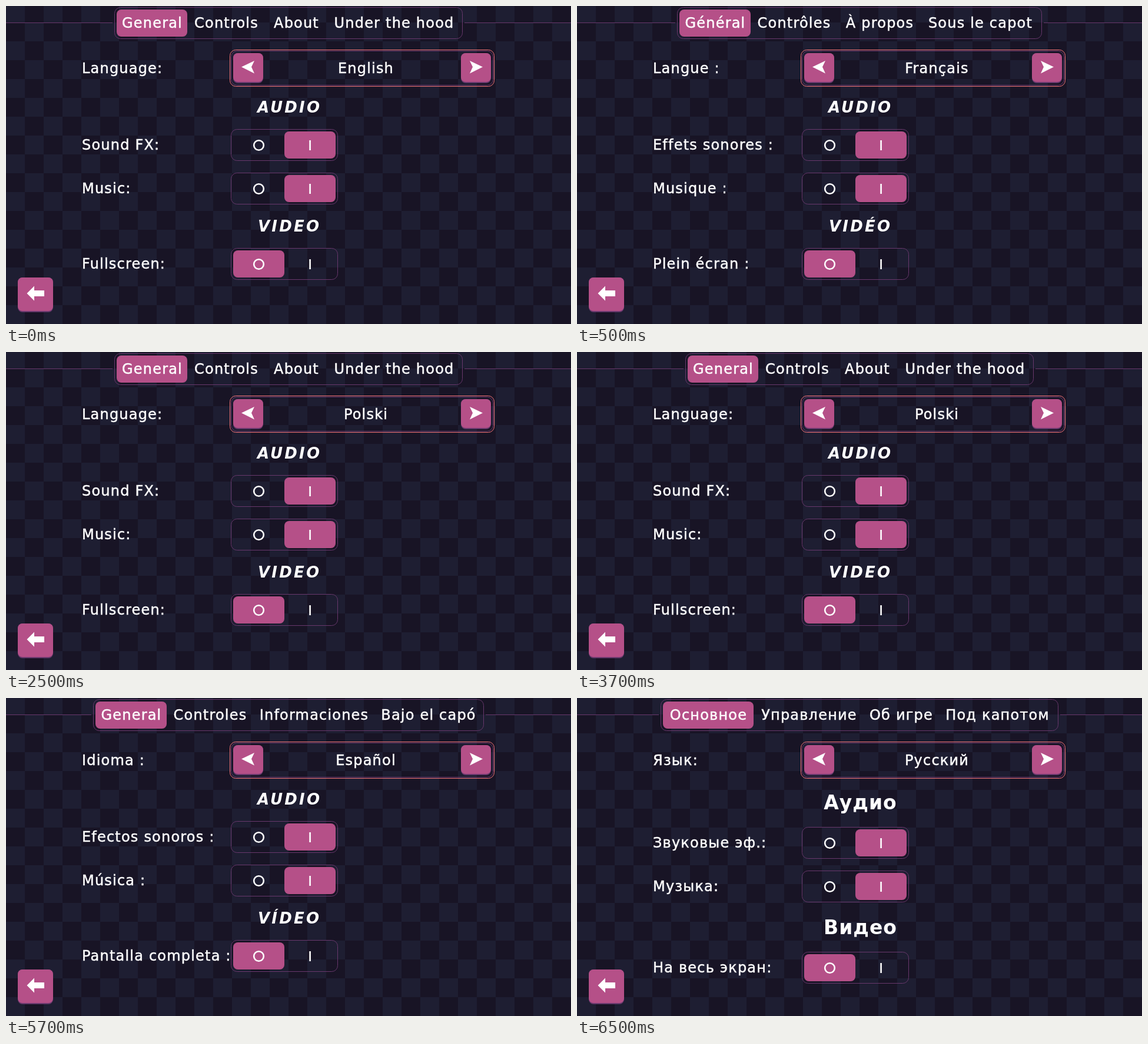
Write an HTML page that moves like this. It is 960x540 px and loops after 8 s.

```html
<!DOCTYPE html>
<html lang="en">
<head>
<meta charset="utf-8">
<title>Settings menu</title>
<style>
  html, body { margin: 0; width: 100%; height: 100%; overflow: hidden; background: #181425; }
  #stage { position: relative; width: 960px; height: 540px; overflow: hidden; }
  #stage svg { display: block; position: absolute; left: 0; top: 0; }
  #strip { animation: switch 8s step-end infinite; }
  #strip svg { position: static; }
  @keyframes switch {
    0% { transform: translateY(0); }
    6.25% { transform: translateY(-540px); }
    31.25% { transform: translateY(-1080px); }
    56.25% { transform: translateY(-1620px); }
    81.25%, 100% { transform: translateY(-2160px); }
  }
  text {
    fill: #fff; stroke: #fff; stroke-width: .5px;
    font: 24px "DejaVu Sans", sans-serif; letter-spacing: 1.2px;
  }
  .mid { text-anchor: middle; }
  .head, .headCyr { stroke: none; }
  .head { font: italic bold 26px "DejaVu Sans", sans-serif; letter-spacing: 3.2px; }
  .headCyr { font: bold 33px "DejaVu Sans", sans-serif; letter-spacing: 1px; }
  .line { fill: none; stroke: #68386c; }
  .focus { fill: none; stroke: #f6757a; }
  .btn { fill: #b55088; }
  .shade { fill: #68386c; }
  .icon { fill: #fff; }
  .ring { fill: none; stroke: #fff; stroke-width: 2.6; }
</style>
</head>
<body>
<div id="stage">
  <svg width="960" height="540">
    <defs>
      <pattern id="checker" width="64" height="64" y="-4" patternUnits="userSpaceOnUse">
        <path d="M0 0h32v64h32v-32h-64z" fill="#1e1e32"/>
      </pattern>
    </defs>
    <rect width="960" height="540" fill="#181425"/>
    <rect width="960" height="540" fill="url(#checker)"/>
  </svg>
  <div id="strip"></div>
  <svg width="960" height="540" id="fixed"></svg>
</div>
<script>
const box = (x, y, w, h, cls, r = 8) =>
  `<rect x="${x}" y="${y}" width="${w}" height="${h}" rx="${r}" class="${cls}"/>`;
const frame = (x, y, w, h, cls = 'line') => box(x + .5, y + .5, w - 1, h - 1, cls, 10);
const text = (x, y, str, cls = '') => `<text x="${x}" y="${y}" class="${cls}">${str}</text>`;
const icon = d => `<path class="icon" d="${d}"/>`;
const button = (x, y, w, h, d) => box(x, y, w, h, 'shade') + box(x, y, w, h - 2, 'btn') + icon(d);

function toggle(y, on) {
  return frame(382, y, 182, 54) + box(on ? 473 : 386, y + 4, 87, 46, 'btn') +
    `<circle class="ring" cx="429.5" cy="${y + 27.5}" r="8.3"/>` +
    icon(`M515.3 ${y + 19}h2.6v17h-2.6z`);
}

// The tab bar is centred on the stage, so its left edge gives the right one.
function nav(s) {
  const left = s.left, right = 960 - left;
  return `<path class="line" d="M0 28.5H${left - 3}M${right + 3} 28.5H960"/>` +
    frame(left, 2, right - left, 54) +
    box(left + 4, 6, s.activeEnd - left - 4, 46, 'btn') +
    s.tabs.map((t, i) => text(s.at[i], 37, t, 'mid')).join('');
}

function screen(s) {
  const gap = s.cyr ? 10 : 0;
  const tops = [209 + gap, 283 + gap, 411 + 2 * gap];
  const title = (str, y) => s.cyr ? text(481.5, y + 8, str, 'mid headCyr')
                                  : text(481.6, y, str, 'mid head');
  return '<svg width="960" height="540">' + nav(s) +
    text(129, 114, s.labels[0]) + text(611.5, 114, s.name, 'mid') +
    title(s.heads[0], 181) + title(s.heads[1], s.cyr ? 393 : 383) +
    tops.map((y, i) => text(129, y + 35, s.labels[i + 1]) + toggle(y, i < 2)).join('') +
    '</svg>';
}

const english = {
  name: 'English', left: 184, activeEnd: 308,
  tabs: ['General', 'Controls', 'About', 'Under the hood'], at: [248.5, 374.5, 493.5, 659.5],
  labels: ['Language:', 'Sound FX:', 'Music:', 'Fullscreen:'], heads: ['AUDIO', 'VIDEO']
};
const french = {
  name: 'Français', left: 170, activeEnd: 295,
  tabs: ['Général', 'Contrôles', 'À propos', 'Sous le capot'], at: [235, 369, 514.5, 685.5],
  labels: ['Langue :', 'Effets sonores :', 'Musique :', 'Plein écran :'], heads: ['AUDIO', 'VIDÉO']
};
const polish = { ...english, name: 'Polski' };
const spanish = {
  name: 'Español', left: 148, activeEnd: 273,
  tabs: ['General', 'Controles', 'Informaciones', 'Bajo el capó'], at: [213, 347, 523.5, 718],
  labels: ['Idioma :', 'Efectos sonoros :', 'Música :', 'Pantalla completa :'], heads: ['AUDIO', 'VÍDEO']
};
const russian = {
  name: 'Русский', left: 142, activeEnd: 300, cyr: true,
  tabs: ['Основное', 'Управление', 'Об игре', 'Под капотом'], at: [223.5, 394.5, 551, 714.5],
  labels: ['Язык:', 'Звуковые эф.:', 'Музыка:', 'На весь экран:'], heads: ['Аудио', 'Видео']
};

document.getElementById('strip').innerHTML =
  [english, french, polish, spanish, russian].map(screen).join('');

document.getElementById('fixed').innerHTML =
  frame(380, 74, 450, 63, 'focus') + frame(382, 76, 446, 59) +
  button(386, 80, 51, 51, 'M400 103.5L422 93L417 103.5L422 114.5z') +
  button(773, 80, 51, 51, 'M810 103.5L788 93L793 103.5L788 114.5z') +
  button(20, 461, 60, 59, 'M35.5 488L48 475.5V483H65V493H48V500.5z');
</script>
</body>
</html>
```
